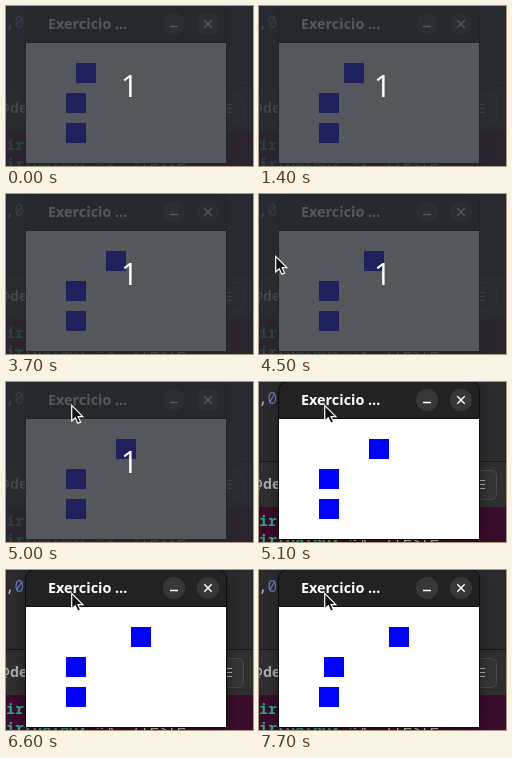
An HTML page for the animation above (8000 ms loop, 247x160 px).

```html
<!DOCTYPE html>
<html lang="pt">
<head>
<meta charset="utf-8">
<style>
html, body { margin: 0; width: 100%; height: 100%; overflow: hidden; background: #2b2b2b; }
svg { display: block; width: 247px; height: 160px; }
.title { font: 700 14.4px "Open Sans", sans-serif; fill: #fff; }
.prompt { font: 700 15px "Noto Sans Mono", monospace; fill: #2aa583; }
.count { font: 31px "Open Sans", sans-serif; fill: #fff; text-anchor: middle; }
.line { fill: none; stroke: #fff; stroke-width: 1.4; }
</style>
</head>
<body>
<svg viewBox="0 0 247 160">
  <defs>
    <filter id="blur" x="-20%" y="-20%" width="140%" height="140%"><feGaussianBlur stdDeviation="6"/></filter>
  </defs>

  <!-- desktop behind the window -->
  <rect width="247" height="160" fill="#2b2b2e"/>
  <text x="-1" y="22" font-size="16" font-family="Noto Sans Mono, monospace" fill="#b8b8c0">,<tspan fill="#667bb8">0</tspan></text>
  <rect y="79" width="247" height="46" fill="#2e2e2e"/>
  <path d="M0 79.5H247" stroke="#171717"/>
  <text class="title" x="-9" y="107" style="fill:#aaa">@dev</text>
  <rect x="206.5" y="88.5" width="31" height="29" rx="5" fill="#333" stroke="#484848"/>
  <path class="line" d="M217 98.5h9m-9 4h9m-9 4h9" style="stroke:#aaa;stroke-width:1"/>
  <rect y="125" width="247" height="35" fill="#380c2a"/>
  <text class="prompt" x="0" y="144">ir</text>
  <text class="prompt" x="0" y="162.5">irtualBox<tspan fill="#ccc" font-weight="400">:~$ ./teste</tspan></text>

  <!-- application window -->
  <rect x="20" y="2" width="200" height="157" rx="10" opacity=".4" filter="url(#blur)"/>
  <path d="M19.5 157.5V10q0-10.5 10.5-10.5H210q10.5 0 10.5 10.5V157.5Z" fill="#222" stroke="#0c0c0c"/>
  <path d="M20 36.5H220" stroke="#101010"/>
  <path d="M20 37H220V157H20Z" fill="#fff"/>
  <text class="title" x="42" y="23">Exercicio …</text>
  <g fill="#373737"><circle cx="168" cy="18" r="11"/><circle cx="202" cy="18" r="11"/></g>
  <path class="line" d="M164 20.5h8M198.3 14.3l7.4 7.4m0-7.4l-7.4 7.4"/>
  <g fill="#00f">
    <rect id="first" y="57" width="20" height="20"/>
    <rect id="second" y="87" width="20" height="20"/>
    <rect x="60" y="117" width="20" height="20"/>
  </g>

  <g id="countdown">
    <rect width="247" height="160" fill="#272a31" fill-opacity=".79"/>
    <text class="count" x="123.5" y="91">1</text>
  </g>
  <path id="cursor" d="M.7 1.4V17L4.3 13.7L6.8 19.3L9.6 18.1L7.1 12.7H11.8Z" fill="#111" stroke="#fff" stroke-width="1.2"/>
</svg>
<script>
const LOOP = 8000, STEP = 5, BRIGHT_AT = 5100;
const firstMoves = [600, 800, 1400, 2100, 2600, 3700, 4200, 4800, 5500, 6000, 6600, 7300];
const secondMoves = [7700];
const pointer = [[4400, 1, 66], [4500, 16, 61], [4600, 32, 53], [4800, 48, 40], [4900, 59, 29], [5000, 65, 22]];

const el = id => document.getElementById(id);
const stepped = (start, times, t) => start + STEP * times.filter(time => time <= t).length;
const show = (node, visible) => node.setAttribute('visibility', visible ? 'visible' : 'hidden');
const first = el('first'), second = el('second'), countdown = el('countdown'), cursor = el('cursor');

function draw(now) {
  const t = now % LOOP;
  first.setAttribute('x', stepped(70, firstMoves, t));
  second.setAttribute('x', stepped(60, secondMoves, t));
  show(countdown, t < BRIGHT_AT);

  const place = pointer.filter(([time]) => time <= t).pop();
  show(cursor, place);
  if (place) cursor.setAttribute('transform', `translate(${place[1]} ${place[2]})`);
  requestAnimationFrame(draw);
}
draw(performance.now());
</script>
</body>
</html>
```
